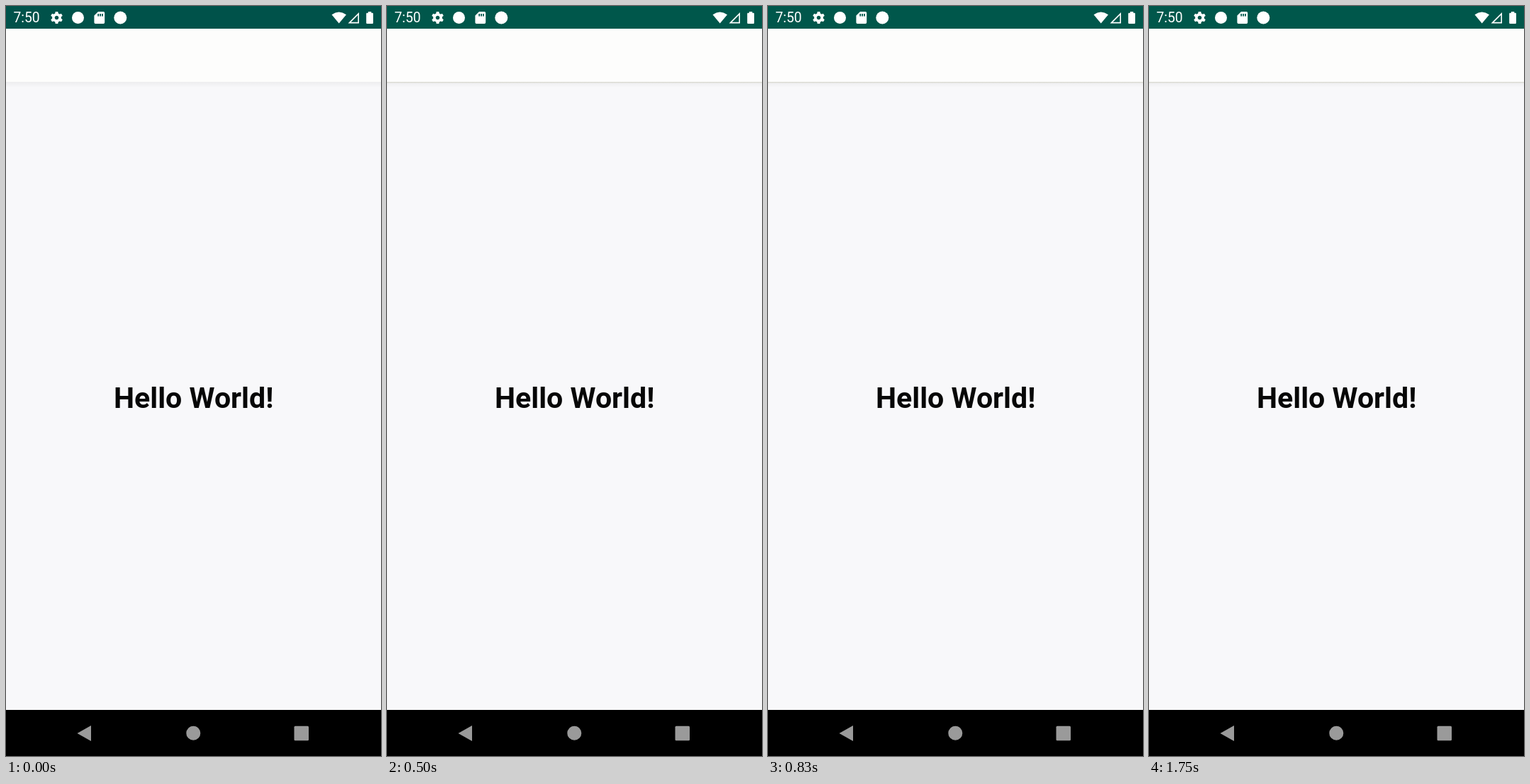
These frames come from a looping animation (529x1058 px, 1790 ms). An HTML page:

```html
<!DOCTYPE html>
<html lang="en">
<head>
<meta charset="utf-8">
<title>Hello World</title>
<style>
  html, body { margin: 0; width: 100%; height: 100%; overflow: hidden; background: #f8f8fa; }
  svg { display: block; width: 529px; height: 1058px; font-family: Roboto, sans-serif; }
</style>
</head>
<body>
<svg viewBox="0 0 529 1058">
  <defs>
    <linearGradient id="fade" x2="0" y2="1">
      <stop stop-color="#000" stop-opacity=".045"/>
      <stop offset="1" stop-color="#000" stop-opacity="0"/>
    </linearGradient>
  </defs>

  <rect width="529" height="1058" fill="#f8f8fa"/>
  <rect y="32" width="529" height="75" fill="#fdfdfc"/>
  <rect id="edge" y="107" width="529" height="1.5" fill="#e5e5dd"/>
  <rect y="107" width="529" height="8" fill="url(#fade)"/>
  <rect id="status" width="529" height="32" fill="#00574b"/>

  <g fill="#fff">
    <text x="10.5" y="23.4" font-size="19.3">7:50</text>
    <!-- gear -->
    <g transform="translate(71.5 16.5)">
      <circle r="4.6" fill="none" stroke="#fff" stroke-width="3.6"/>
      <g id="teeth"></g>
    </g>
    <circle cx="101.5" cy="16.5" r="8.5"/>
    <!-- memory card -->
    <path fill-rule="evenodd" d="M130 8h7.4q1.8 0 1.8 1.8v13.4q0 1.8-1.8 1.8h-11.2q-1.8 0-1.8-1.8v-9.6zM129.3 11v3.6h1.8v-3.6zM132.2 11v3.6h1.8v-3.6zM135.1 11v3.6h1.8v-3.6z"/>
    <circle cx="161.3" cy="16.5" r="9"/>
    <!-- wifi, signal, battery -->
    <path d="M459.5 12.2q10-7.2 20.5 0L469.7 24.6z"/>
    <path d="M484.5 23.6L497.2 11v12.6z" fill="none" stroke="#fff" stroke-width="1.6"/>
    <path d="M511 8h4.3v1.7h1.5q1.2 0 1.2 1.2v12.9q0 1.2-1.2 1.2h-7.4q-1.2 0-1.2-1.2V10.900q0-1.200 1.200-1.200h1.600z"/>
  </g>

  <text x="264.7" y="567.3" font-size="41.1" font-weight="700" text-anchor="middle" fill="#070707">Hello World!</text>

  <rect y="993" width="529" height="65"/>
  <g fill="#9a9a9a">
    <path d="M100.500 1026L120 1015v22z"/>
    <circle cx="264.3" cy="1025.700" r="10"/>
    <rect x="406.500" y="1015.700" width="20.500" height="20.500" rx="1.500"/>
  </g>
</svg>
<script>
  const LOOP = 1790, SETTLE = 40;
  const get = id => document.getElementById(id);

  get("teeth").innerHTML = [0, 60, 120, 180, 240, 300].map(a =>
    `<path d="M-2.400 -5L-1.800 -8.500H1.800L2.400 -5z" transform="rotate(${a})"/>`).join("");

  // The bar starts darker and without its edge line, then settles.
  function draw(now) {
    const settled = now % LOOP >= SETTLE;
    get("status").setAttribute("fill", settled ? "#00574b" : "#00524a");
    get("edge").setAttribute("opacity", settled ? 1 : 0);
    requestAnimationFrame(draw);
  }
  draw(performance.now());
</script>
</body>
</html>
```
